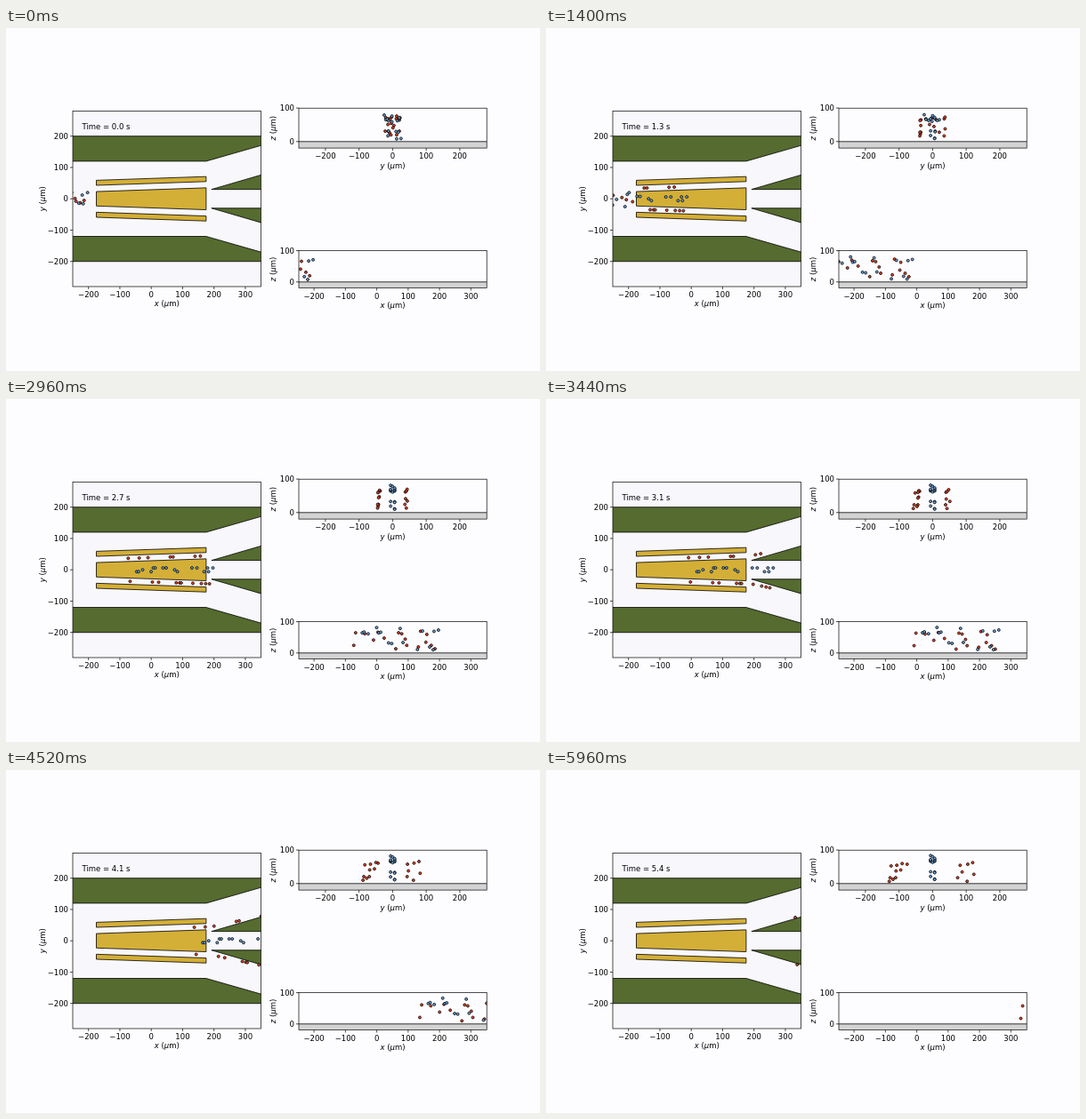
Write an HTML page with a canvas that moves like this. It is 600 by 386 pixels and loops after 6 s.

```html
<!DOCTYPE html>
<html>
<head>
<meta charset="utf-8">
<style>
  html, body { margin: 0; width: 600px; height: 386px; overflow: hidden; background: #fdfdff; }
  canvas { display: block; }
</style>
</head>
<body>
<canvas id="stage" width="600" height="386"></canvas>
<script>
const c = document.getElementById('stage').getContext('2d');
const FONT = '8.5px "DejaVu Sans", sans-serif';
const SPEED = 150;

// Starting x, y, z in micrometres.
const reds = [
  [-473, 20, 31], [-438, 11, 68], [-410, 4, 48], [-339, 12, 20], [-330, 22, 71], [-260, 12, 76],
  [-243, 1, 41], [-467, -20, 71], [-396, -3, 73], [-376, -4, 54], [-320, -12, 68], [-309, -14, 51],
  [-304, -22, 31], [-267, -9, 26], [-240, -8, 66], [-226, -13, 31], [-214, -5, 20]
];
const blues = [
  [-446, -12, 62], [-440, -20, 65], [-427, -2, 59], [-400, -25, 79], [-393, 14, 62], [-387, 20, 64],
  [-362, 10, 30], [-352, 17, 28], [-325, -2, 76], [-316, -12, 31], [-270, 25, 9], [-254, 20, 68],
  [-231, -14, 17], [-220, 12, 8], [-217, -16, 67], [-203, 20, 71]
];

const xTicks = [-200, -100, 0, 100, 200, 300];
const panels = [
  { box: [75, 93.6, 211.5, 197.4], ox: 163.2, oy: 192.2, k: .3525, h: 'x', v: 'y', vx: 44,
    hTicks: xTicks, vTicks: [-200, -100, 0, 100, 200], bg: '#f8f7fb', labelY: 313 },
  { box: [329, 90.2, 211.2, 44.9], ox: 434.4, oy: 127.8, k: .3775, h: 'y', v: 'z', vx: 303,
    hTicks: [-200, -100, 0, 100, 200], vTicks: [0, 100], bg: '#fdfcff', labelY: 158 },
  { box: [329, 250.5, 211.2, 42], ox: 416.6, oy: 285.8, k: .3525, h: 'x', v: 'z', vx: 303,
    hTicks: xTicks, vTicks: [0, 100], bg: '#fdfcff', labelY: 315 }
];

const GREEN = '#556b2f', GOLD = '#d4af37';
const shapes = [
  [GREEN, [-260, 200, 360, 200, 360, 173, 175, 120, -260, 120]],
  [GREEN, [-260, -200, 360, -200, 360, -173, 175, -120, -260, -120]],
  [GREEN, [192, 30, 360, 79, 360, 30]],
  [GREEN, [192, -30, 360, -79, 360, -30]],
  [GOLD, [-175, 23, 175, 35, 175, -35, -175, -23]],
  [GOLD, [-175, 59, 175, 71, 175, 55, -175, 43]],
  [GOLD, [-175, -59, 175, -71, 175, -55, -175, -43]]
];

function text(s, x, y, align = 'center') {
  c.font = FONT;
  c.fillStyle = '#000';
  c.textAlign = align;
  c.fillText(s, x, y);
}

function axisLabel(name, x, y, angle = 0) {
  const parts = [[name, 1], [' (', 0], ['μ', 1], ['m)', 0]];
  const style = italic => { c.font = (italic ? 'italic ' : '') + FONT; };
  const width = ([s, italic]) => { style(italic); return c.measureText(s).width; };
  c.save();
  c.translate(x, y);
  c.rotate(angle);
  c.fillStyle = '#000';
  c.textAlign = 'left';
  let at = -parts.reduce((sum, p) => sum + width(p), 0) / 2;
  for (const p of parts) {
    const w = width(p);
    c.fillText(p[0], at, 0);
    at += w;
  }
  c.restore();
}

function line(x1, y1, x2, y2) {
  c.beginPath();
  c.moveTo(x1, y1);
  c.lineTo(x2, y2);
  c.stroke();
}

function polygon(p, [color, pts]) {
  c.beginPath();
  for (let i = 0; i < pts.length; i += 2) c.lineTo(p.ox + pts[i] * p.k, p.oy - pts[i + 1] * p.k);
  c.closePath();
  c.fillStyle = color;
  c.fill();
  c.stroke();
}

// Particles focus on entering the electrodes; reds then follow the gaps and fan out.
function locate([x0, y0, z0], red, s) {
  const x = x0 + SPEED * s;
  const u = Math.min(1, Math.max(0, (x + 200) / 48));
  const ease = u * u * (3 - 2 * u);
  const lane = red
    ? 33.5 + .031 * (Math.min(190, x) + 175) + .21 * Math.max(0, x - 190)
    : Math.abs(y0) > 4 ? 6 : 0;
  return {
    x,
    y: y0 + (Math.sign(y0) * lane - y0) * ease,
    z: z0 + (red ? -2.5 : .8) * s
  };
}

function drawPanel(p, dots, s) {
  const [l, t, w, h] = p.box, b = t + h;
  c.lineWidth = .8;
  c.strokeStyle = '#000';
  c.save();
  c.beginPath();
  c.rect(l, t, w, h);
  c.clip();
  c.fillStyle = p.bg;
  c.fillRect(l, t, w, h);
  if (p.v === 'y') {
    shapes.forEach(shape => polygon(p, shape));
  } else {
    c.fillStyle = '#d3d3d3';
    c.fillRect(l, p.oy, w, b - p.oy);
    line(l, p.oy, l + w, p.oy);
  }
  for (const d of dots) {
    c.beginPath();
    c.arc(p.ox + d[p.h] * p.k, p.oy - d[p.v] * p.k, 1.5, 0, 7);
    c.fillStyle = d.color;
    c.fill();
    c.stroke();
  }
  c.restore();

  c.lineWidth = .7;
  c.strokeRect(l, t, w, h);
  const number = n => String(n).replace('-', '−');
  for (const n of p.hTicks) {
    const x = p.ox + n * p.k;
    line(x, b, x, b + 3);
    text(number(n), x, b + 12.2);
  }
  for (const n of p.vTicks) {
    const y = p.oy - n * p.k;
    line(l - 3, y, l, y);
    text(number(n), l - 5, y + 3.1, 'right');
  }
  axisLabel(p.h, l + w / 2, p.labelY);
  axisLabel(p.v, p.vx, t + h / 2, -Math.PI / 2);
  if (p.v === 'y') text(`Time = ${s.toFixed(1)} s`, 85.5, 113.5, 'left');
}

function draw(now) {
  const s = Math.floor(now % 6000 / 40) * .036;
  const dots = [
    ...reds.map(d => ({ ...locate(d, true, s), color: '#ee4420' })),
    ...blues.map(d => ({ ...locate(d, false, s), color: '#6aa5dc' }))
  ];
  c.fillStyle = '#fdfdff';
  c.fillRect(0, 0, 600, 386);
  panels.forEach(p => drawPanel(p, dots, s));
}

const start = performance.now();
function tick() {
  draw(performance.now() - start);
  requestAnimationFrame(tick);
}
tick();
</script>
</body>
</html>
```
